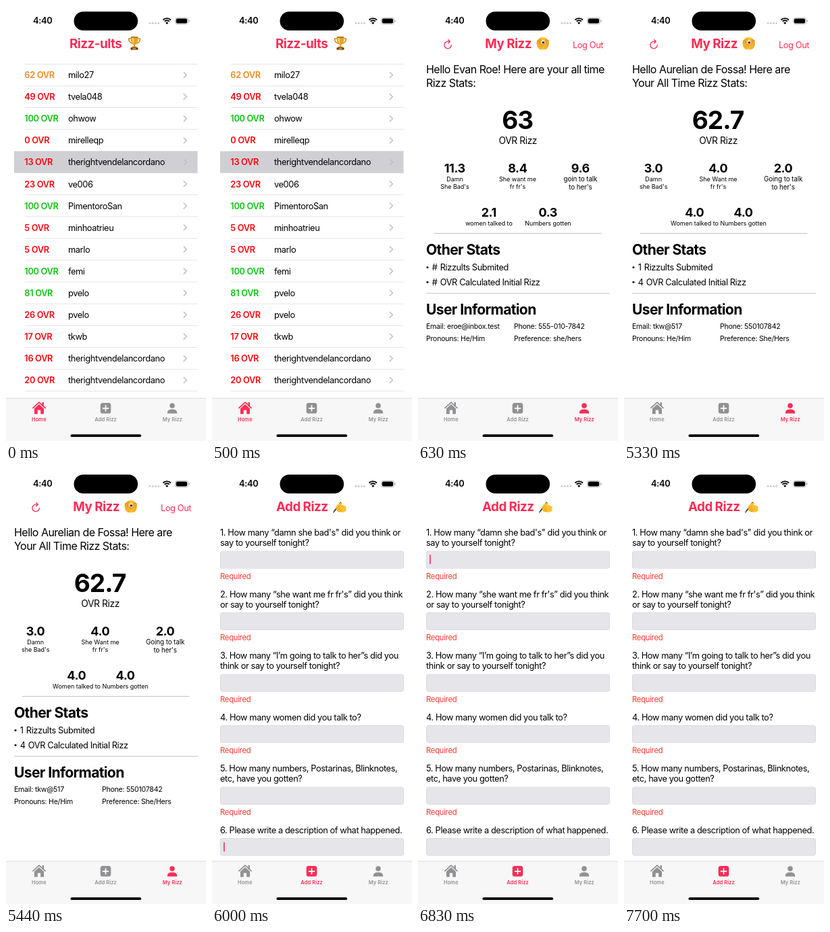
Write an HTML page with a canvas that moves like this. It is 296 by 640 pixels and loops after 8000 ms.

```html
<!DOCTYPE html>
<html lang="en">
<head>
<meta charset="utf-8">
<title>Rizz app</title>
<style>
html, body { margin: 0; width: 100%; height: 100%; overflow: hidden; background: #fff; }
canvas { display: block; width: 296px; height: 640px; }
</style>
</head>
<body>
<canvas id="stage"></canvas>
<script>
const W = 296, H = 640, LOOP = 8000;
const PINK = '#fc2d55', RED = '#f6090f', GREEN = '#10c316', ORANGE = '#f08a1e', GREY = '#919193';
const canvas = document.getElementById('stage');
const ctx = canvas.getContext('2d');
const dpr = window.devicePixelRatio || 1;
canvas.width = W * dpr;
canvas.height = H * dpr;

// Text styles: size, weight, tracking in em
const STYLE = {
  title: [18.8, 700, -0.028],
  body: [12.8, 400, -0.031],
  score: [12.8, 600, -0.026],
  hello: [16, 400, -0.033],
  huge: [37, 700, -0.025],
  sub: [13.8, 400, -0.03],
  stat: [18, 700, -0.025],
  small: [9, 400, -0.003],
  mid: [9.8, 400, -0.01],
  head: [21.1, 700, -0.031],
  info: [10.5, 400, -0.02],
  note: [11.3, 400, -0.025],
  tab: [7.5, 600, 0.01],
  clock: [12.8, 600, -0.02]
};

function text(str, x, y, style, color = '#000', align = 'left') {
  const [size, weight, track] = STYLE[style];
  ctx.font = `${weight} ${size}px Inter, "Liberation Sans", sans-serif`;
  ctx.letterSpacing = size * track + 'px';
  ctx.textAlign = align;
  ctx.fillStyle = color;
  // Tracking after the last letter must not shift centred text
  ctx.fillText(str, align === 'center' ? x + size * track / 2 : x, y);
}

const centered = (str, x, y, style, color) => text(str, x, y, style, color, 'center');

function rect(x, y, w, h, color) {
  ctx.fillStyle = color;
  ctx.fillRect(x, y, w, h);
}

function round(x, y, w, h, r, color) {
  ctx.beginPath();
  ctx.roundRect(x, y, w, h, r);
  ctx.fillStyle = color;
  ctx.fill();
}

function disc(x, y, r, color, ry = r) {
  ctx.beginPath();
  ctx.ellipse(x, y, r, ry, 0, 0, Math.PI * 2);
  ctx.fillStyle = color;
  ctx.fill();
}

function shape(d, fill) {
  ctx.fillStyle = fill;
  ctx.fill(new Path2D(d));
}

function line(d, color, width) {
  ctx.strokeStyle = color;
  ctx.lineWidth = width;
  ctx.lineCap = ctx.lineJoin = 'round';
  ctx.stroke(new Path2D(d));
}

function at(x, y, draw) {
  ctx.save();
  ctx.translate(x, y);
  draw();
  ctx.restore();
}

// Emoji, each in a 20 x 20 box
function trophy() {
  line('M5 3.5H1.5C1.5 8 3.5 9.5 6.5 10.5M15 3.5h3.5C18.5 8 16.5 9.5 13.5 10.5', '#c98a1c', 1.5);
  shape('M4.5 1h11C15.5 8 14 11.5 11.2 12.6V15.5H8.8V12.6C6 11.5 4.5 8 4.5 1Z', '#e3a526');
  shape('M6.5 2h2.3L9.2 11C7.3 9.5 6.5 6 6.5 2Z', '#f8d774');
  disc(10, 1.4, 5.5, '#a96a14', 0.9);
  shape('M7 15h6l1 2H6Z', '#c98a1c');
  round(4.5, 16.5, 11, 3.5, 0.8, '#6b3a1c');
  rect(7.5, 17.4, 5, 1.6, '#d9a93c');
}

function peekFace() {
  disc(10, 10, 9.3, '#fbc535');
  disc(10.3, 8.6, 3, '#fff');
  disc(10.6, 8.8, 1.8, '#4a2b14');
  const fingers = 'M4 15L3 6.5M6 14L6.3 4.8M8.3 14.5L9.8 11.8M16 15L17.3 6.5M14 14L14.6 5.2';
  line(fingers, '#b9781c', 3);
  line(fingers, '#f6b02c', 2.2);
  shape('M2.6 12Q6 11 8.8 13.2Q9 18 6 19Q2.5 18 2.6 12Z', '#f6b02c');
  shape('M17.6 12Q14 11 11.8 13.2Q11.5 18 14 19Q17.6 18 17.6 12Z', '#f6b02c');
}

function writingHand() {
  line('M1.5 18.5L11.8 4.5', '#3e4147', 2);
  line('M1 19.2L2 17.8', '#d9a066', 1.1);
  shape('M4.5 12Q6 7 10.5 5.5Q13.5 3.5 14.5 5.3L13 8Q17 7.5 20 10.5V16.5Q16 19.8 11 18.2Q6.8 18.5 6.2 16Z', '#fbc231');
  line('M5.5 13.2L10.3 9.6M7 16L11.5 12.7M9.3 17.8L12.8 15.2', '#cf8518', 0.8);
}

function statusBar() {
  text('4:40', 40, 26.3, 'clock');
  round(100.5, 8.3, 94.6, 27.8, 13.9, '#000');
  for (let i = 0; i < 4; i++) disc(213 + i * 4.2, 25.3, 1.4, '#c8c8ca');
  ctx.lineCap = 'butt';
  ctx.strokeStyle = '#000';
  ctx.lineWidth = 1.9;
  for (const r of [5.1, 8.2]) {
    ctx.beginPath();
    ctx.arc(238.2, 26.3, r, -Math.PI * 0.75, -Math.PI * 0.25);
    ctx.stroke();
  }
  shape('M238.2 27L236 24.5Q238.2 22.8 240.4 24.5Z', '#000');
  ctx.beginPath();
  ctx.roundRect(250.5, 17.3, 19, 9.4, 3);
  ctx.lineWidth = 0.8;
  ctx.strokeStyle = '#a8a8a8';
  ctx.stroke();
  round(251.7, 18.5, 16.4, 7, 2, '#000');
  round(270.5, 20.3, 1.2, 3.3, 0.6, '#a8a8a8');
}

function tabBar(active) {
  const tint = i => i === active ? PINK : GREY;
  rect(0, 577, W, 63, '#f7f7f8');
  rect(0, 576.7, W, 0.8, '#d3d3d5');

  line('M40 591.3L49 583.2L58 591.3', tint(0), 1.8);
  shape('M53.6 583h2.4v6h-2.4ZM42 592.3L49 586L56 592.3V600.3H51.2V594.5H46.8V600.3H42Z', tint(0));
  centered('Home', 48.8, 610.9, 'tab', tint(0));

  round(139.7, 584, 15.6, 15.6, 3.4, tint(1));
  line('M147.5 587.8V595.8M143.5 591.8H151.5', '#fff', 1.7);
  centered('Add Rizz', 147.5, 610.9, 'tab', tint(1));

  disc(246, 588, 3.8, tint(2));
  shape('M238.8 599.6Q238.3 593.2 246 593.2Q253.7 593.2 253.2 599.6Z', tint(2));
  centered('My Rizz', 246.3, 610.9, 'tab', tint(2));

  round(95.5, 630.3, 104.6, 3.8, 1.9, '#000');
}

const ROWS = [
  [62, 'milo27'], [49, 'tvela048'], [100, 'ohwow'], [0, 'mirelleqp'],
  [13, 'therightvendelancordano'], [23, 've006'], [100, 'PimentoroSan'],
  [5, 'minhoatrieu'], [5, 'marlo'], [100, 'femi'], [81, 'pvelo'], [26, 'pvelo'],
  [17, 'tkwb'], [16, 'therightvendelancordano'], [20, 'therightvendelancordano']
];
const PITCH = 32.07;

function resultsScreen() {
  text('Rizz-ults', 94, 61.8, 'title', PINK);
  at(180, 44.5, trophy);
  for (let i = 0; i <= ROWS.length; i++) rect(28, 85 + i * PITCH, 255.5, 0.8, '#dededf');
  rect(12, 85.3 + 4 * PITCH, 271.5, PITCH, '#d0d0d4');
  ROWS.forEach(([score, name], i) => {
    const y = 101.5 + i * PITCH;
    const color = score > 75 ? GREEN : score > 50 ? ORANGE : RED;
    text(score + ' OVR', 27.3, y + 4.7, 'score', color);
    text(name, 92, y + 4.7, 'body');
    line(`M263.2 ${y - 4}L267.4 ${y}L263.2 ${y + 4}`, '#bdbdc0', 1.4);
  });
  tabBar(0);
}

const SAMPLE = {
  hello: ['Hello Evan Roe! Here are your all time', 'Rizz Stats:'],
  ovr: '63', mid: 147.7,
  stats: [
    [54.5, '11.3', 'Damn', "She Bad's", 'small'],
    [147.5, '8.4', 'She want me', "fr fr's", 'small'],
    [240.5, '9.6', 'goin to talk', "to her's", 'mid']
  ],
  pair: [[105, '2.1', 'women talked to'], [192.5, '0.3', 'Numbers gotten']],
  counts: ['#', '#'],
  info: ['Email: eroe@inbox.test', 'Phone: 555-010-7842', 'Pronouns: He/Him', 'Preference: she/hers']
};
const USER = {
  hello: ['Hello Aurelian de Fossa! Here are', 'Your All Time Rizz Stats:'],
  ovr: '62.7', mid: 139.5,
  stats: [
    [43.7, '3.0', 'Damn', "she Bad's", 'small'],
    [139.5, '4.0', 'She Want me', "fr fr's", 'small'],
    [235.7, '2.0', 'Going to talk', "to her's", 'mid']
  ],
  pair: [[104.5, '4.0', 'Women talked to'], [176.7, '4.0', 'Numbers gotten']],
  counts: ['1', '4'],
  info: ['Email: tkw@517', 'Phone: 550107842', 'Pronouns: He/Him', 'Preference: She/Hers']
};

function profileScreen(p) {
  line('M49.3 57.4A5.2 5.2 0 1 1 44.1 52.2H47.2M44.6 49.6L47.4 52.2L44.6 54.8', PINK, 1.3);
  text('My Rizz', 99.3, 61.8, 'title', PINK);
  at(174.7, 45, peekFace);
  text('Log Out', 229, 62, 'body', PINK);

  p.hello.forEach((s, i) => text(s, 12, 99.2 + i * 20, 'hello'));
  centered(p.ovr, p.mid, 180.6, 'huge');
  centered('OVR Rizz', p.mid + 0.3, 202.6, 'sub');
  for (const [x, value, a, b, style] of p.stats) {
    centered(value, x, 244.7, 'stat');
    centered(a, x, 257.9, style);
    centered(b, x, style === 'mid' ? 269.8 : 269, style);
  }
  for (const [x, value, label] of p.pair) {
    centered(value, x, 310.4, 'stat');
    centered(label, x, 323.3, 'small');
  }
  rect(24, 334, 247.5, 0.9, '#bcbcbe');

  text('Other Stats', 12, 365.6, 'head');
  ['Rizzults Submited', 'OVR Calculated Initial Rizz'].forEach((s, i) => {
    const y = 389 + i * 21.7;
    disc(14, y - 4.4, 1.5, '#000');
    text(p.counts[i], 20.7, y, 'body');
    text(s, 25 + ctx.measureText(p.counts[i]).width, y, 'body');
  });
  rect(12, 422.3, 272, 0.9, '#bcbcbe');

  text('User Information', 12, 454, 'head');
  p.info.forEach((s, i) => text(s, i % 2 ? 142 : 12, i < 2 ? 474.5 : 492.8, 'info'));
  tabBar(2);
}

const QUESTIONS = [
  ['1. How many “damn she bad\'s" did you think or', 'say to yourself tonight?'],
  ['2. How many “she want me fr fr\'s” did you think', 'or say to yourself tonight?'],
  ['3. How many “I’m going to talk to her”s did you', 'think or say to yourself tonight?'],
  ['4. How many women did you talk to?'],
  ['5. How many numbers, Postarinas, Blinknotes,', 'etc, have you gotten?'],
  ['6. Please write a description of what happened.']
];

function addScreen(caretY, caretAlpha) {
  text('Add Rizz', 95, 61.8, 'title', PINK);
  at(178.5, 45, writingHand);
  let y = 97.9;
  QUESTIONS.forEach((lines, i) => {
    lines.forEach((s, k) => text(s, 12, y + k * 15.2, 'body'));
    const top = y + (lines.length - 1) * 15.2 + 7.4;
    round(12, top, 272, 26, 4, '#d6d6da');
    round(12.6, top + 0.6, 270.8, 24.8, 3.5, '#e5e5ea');
    if (i < 5) text('Required', 12, top + 41, 'note', '#fb3a35');
    y = top + 68;
  });
  ctx.globalAlpha = caretAlpha;
  round(17.2, caretY, 1.6, 14, 0.8, PINK);
  ctx.globalAlpha = 1;
  tabBar(1);
}

// Caret fades in two hard steps; focus then jumps to the first field
function caret(t) {
  if (t < 6830) return [549, t < 6350 ? 1 : t < 6470 ? 0.55 : 0.15];
  return [126, t < 7340 ? 1 : t < 7460 ? 0.55 : t < 7700 ? 0.15 : 0];
}

function draw(now) {
  const t = now % LOOP;
  ctx.setTransform(dpr, 0, 0, dpr, 0, 0);
  rect(0, 0, W, H, '#fff');
  statusBar();
  if (t < 630) resultsScreen();
  else if (t < 5330) profileScreen(SAMPLE);
  else if (t < 6000) profileScreen(USER);
  else addScreen(...caret(t));
}

const start = performance.now();
function tick() {
  draw(performance.now() - start);
  requestAnimationFrame(tick);
}
tick();
</script>
</body>
</html>
```
